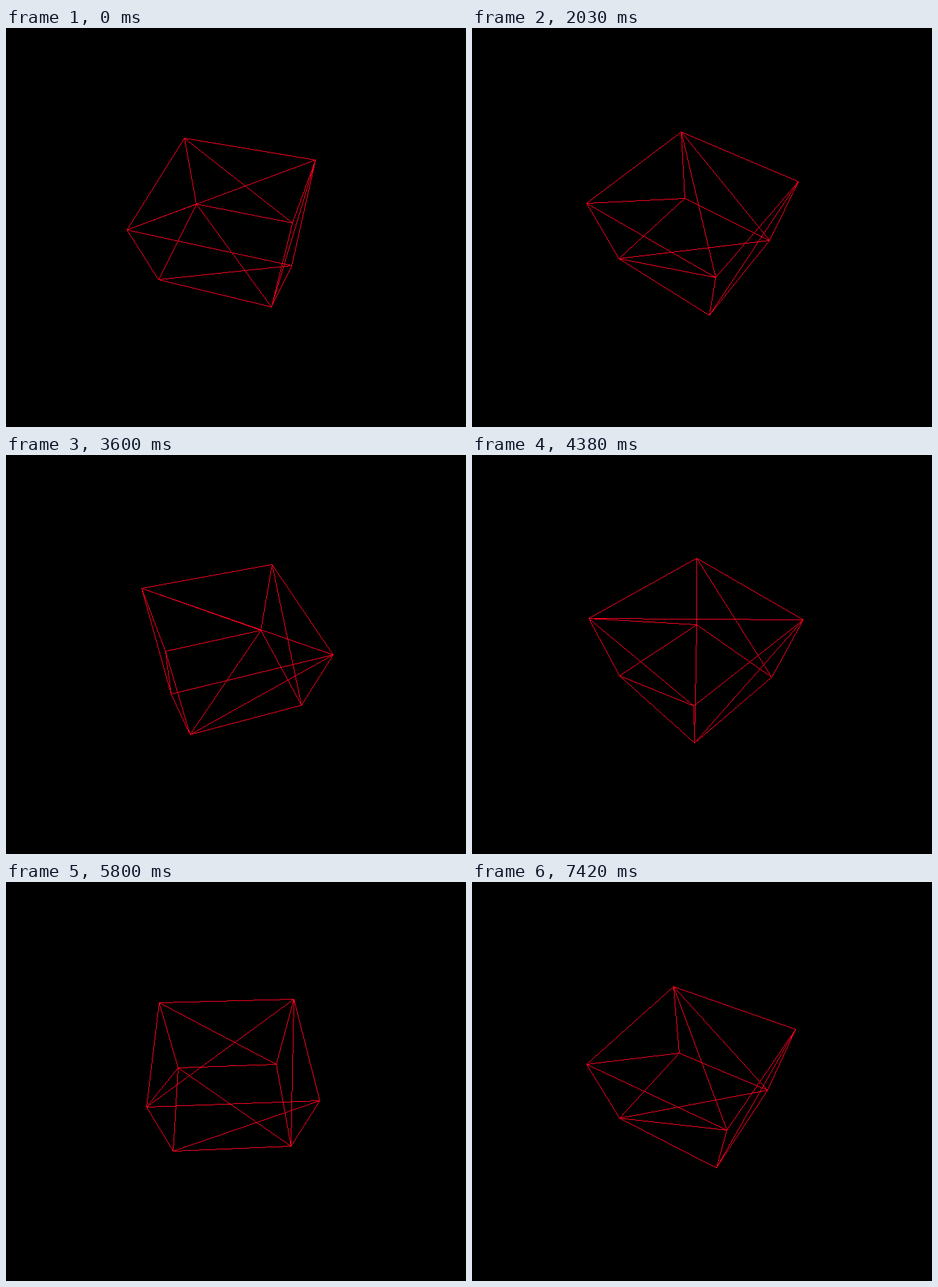
An HTML page with a canvas for the animation above (7510 ms loop, 656 px wide and 570 px high).

```html
<!DOCTYPE html>
<html lang="en">
<head>
<meta charset="utf-8">
<title>Rotating wireframe cube</title>
<style>
  html, body { margin: 0; width: 100%; height: 100%; overflow: hidden; background: #000; }
  canvas { display: block; }
</style>
</head>
<body>
<canvas id="stage" width="656" height="570"></canvas>
<script>
const ctx = document.getElementById('stage').getContext('2d');
const LOOP = 7510, STEPS = 96;
const START = -29.2, TURN = -2.681; // degrees, degrees per step
const AXIS_X = 318.9, HORIZON = -341;

// Projected rings: centre height, radius, depth ratio
const TOP = { y: 234.4, radius: 152.8, depth: 0.1775 };
const BOTTOM = { y: 316.6, radius: 108.6, depth: 0.1262 };

// Steps are even; the first one is a little shorter
function stepAt(time) {
  return Math.min(STEPS - 1, Math.floor(time * STEPS / LOOP + 0.22));
}

function corner(ring, degrees) {
  const a = degrees * Math.PI / 180;
  const d = ring.depth * Math.cos(a);
  return [
    Math.floor(AXIS_X + ring.radius * Math.sin(a) / (1 + d)),
    Math.floor((ring.y + d * HORIZON) / (1 + d))
  ];
}

// One-pixel line without smoothing
function line([x0, y0], [x1, y1]) {
  const n = Math.max(Math.abs(x1 - x0), Math.abs(y1 - y0), 1);
  for (let i = 0; i <= n; i++) {
    ctx.fillRect(Math.round(x0 + (x1 - x0) * i / n), Math.round(y0 + (y1 - y0) * i / n), 1, 1);
  }
}

function draw(step) {
  const angle = START + TURN * step;
  const ring = r => [0, 1, 2, 3].map(i => corner(r, angle + 90 * i));
  const top = ring(TOP), bottom = ring(BOTTOM);

  ctx.fillStyle = '#000';
  ctx.fillRect(0, 0, 656, 570);
  ctx.fillStyle = '#f80020';
  for (let i = 0; i < 4; i++) {
    const next = (i + 1) % 4;
    line(top[i], top[next]);
    line(bottom[i], bottom[next]);
    line(top[i], bottom[i]);
    line(top[i], bottom[next]);
  }
  line(top[1], top[3]);
  line(bottom[0], bottom[2]);
}

const begin = performance.now();
let shown = -1;
function tick() {
  const step = stepAt((performance.now() - begin) % LOOP);
  if (step !== shown) draw(shown = step);
  requestAnimationFrame(tick);
}
tick();
</script>
</body>
</html>
```
